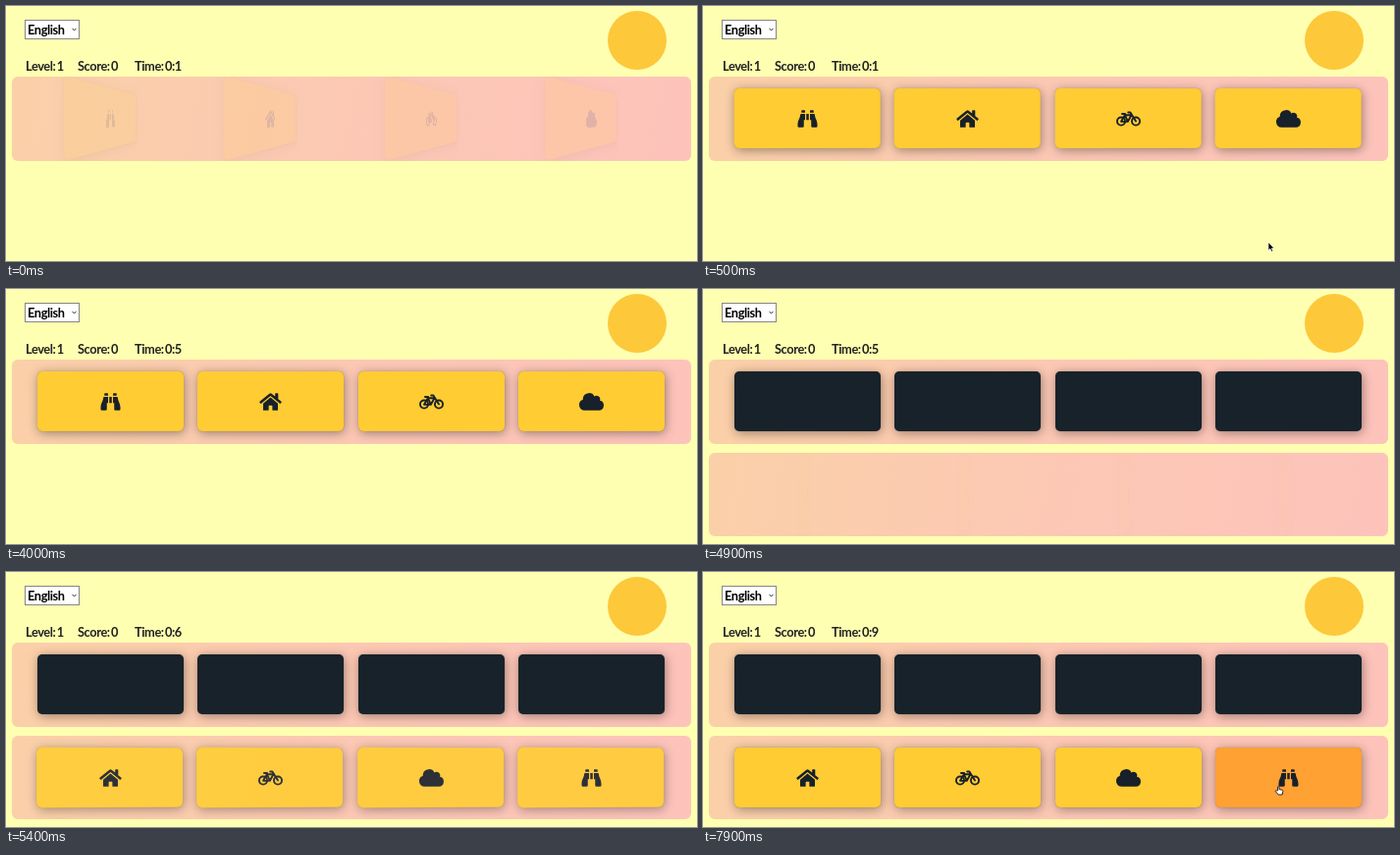
These frames come from a looping animation (704 px wide and 260 px high, 8000 ms). An HTML page:

```html
<!DOCTYPE html>
<html lang="en">
<head>
<meta charset="utf-8">
<style>
  html, body { margin: 0; width: 704px; height: 260px; overflow: hidden; background: #feffb1; }
  body { position: relative; font: 700 12.8px/18px Lato, sans-serif; letter-spacing: -.4px; word-spacing: -1.5px; color: #222; }
  body > *, .card, .pick svg { position: absolute; white-space: nowrap; }
  .pick { left: 19px; top: 14px; width: 52px; height: 18px; padding-left: 2px;
          border: 1px solid #858585; background: #fff; color: #000; }
  .pick svg { left: 47px; top: 7px; }
  .stat { top: 52px; }
  .logo { left: 613px; top: 5px; width: 60px; height: 60px; border-radius: 50%; background: #fdc83a; }
  .row { left: 6px; width: 692px; height: 85.5px; border-radius: 6px;
         background: linear-gradient(100deg, #fad0a8, #fcc8b4 50%, #fdc3bb); overflow: hidden; }
  .card { top: 12px; width: 149.3px; height: 61px; border-radius: 5px; background: #fc3;
          box-shadow: 0 0 1px rgba(0, 0, 0, .4), 1px 2px 11px rgba(0, 0, 0, .38);
          display: flex; align-items: center; justify-content: center; }
  .dark .card { background: #18222a; }
  .card svg { width: 25px; height: 20px; fill: #18202a; }
  .bike { stroke: #18202a; stroke-width: 48; stroke-linejoin: round; stroke-linecap: round; }
  #cursor { left: 0; top: 0; overflow: visible; }
</style>
</head>
<body>
<div class="pick">English<svg width="5" height="4"><path d="M.5 .8 2.5 3 4.5 .8" fill="none" stroke="#333"/></svg></div>
<div class="stat" style="left:20px">Level: 1</div>
<div class="stat" style="left:73px">Score: 0</div>
<div class="stat" style="left:131px">Time: 0:<span id="secs">1</span></div>
<div class="logo"></div>
<div class="row" id="top" style="top:72px"></div>
<div class="row dark" id="hidden" style="top:72px"></div>
<div class="row" id="answers" style="top:166.5px"></div>
<svg id="cursor" width="12" height="16">
  <path id="arrow" d="M0 0V8.2L1.9 6.5 3.2 9.4 4.6 8.8 3.3 6H5.8Z" fill="#000" stroke="#fff" stroke-width=".6"/>
  <path id="hand" d="M1.6 5V.9Q2.3-.2 3 .9V3.6L6.2 4.3Q7 4.6 6.9 5.6L6.2 9H2.2L-.7 5.7Q-.6 4.4 .5 4.8Z" fill="#fff" stroke="#000" stroke-width=".8"/>
</svg>
<script>
const $ = id => document.getElementById(id);
const LOOP = 8000, REVEAL = 4835;

const icons = {
  binoculars: `<path d="M160 96V48q0-16 16-16h64q16 0 16 16v48zM384 96V48q0-16 16-16h64q16 0 16 16v48z
    M128 160q2-32 32-32h96v160h-32v160q0 32-32 32H96q-32 0-32-32v-44c4-130 62-150 64-244z
    M512 160q-2-32-32-32h-96v160h32v160q0 32 32 32h96q32 0 32-32v-44c-4-130-62-150-64-244zM288 128h64v160h-64z"/>`,
  house: `<path d="M320 142 128 300v164q0 16 16 16h112q16 0 16-16v-96q0-16 16-16h64q16 0 16 16v96q0 16 16 16h112q16 0 16-16V300z
    M604 251 520 183V44q0-12-12-12h-56q-12 0-12 12v73L350 43q-30-22-60 0L36 251q-9 8-2 17l26 31q8 9 17 2L320 101 563 301q9 7 17-2l26-31q7-9-2-17z"/>`,
  bicycle: `<g class="bike" fill="none"><circle cx="128" cy="320" r="104"/><circle cx="512" cy="320" r="104"/>
    <path d="M312 88H368L512 320M152 128H232M128 328 226 160H396L304 328H128M226 160 304 328"/></g>`,
  cloud: `<path d="M538 227A96 96 0 0 0 395 112 160 160 0 0 0 96 200 144 144 0 0 0 144 480H512A128 128 0 0 0 538 227z"/>`
};

const flip = [
  { transform: "perspective(222px) rotateY(90deg)", offset: 0, easing: "ease-in" },
  { transform: "perspective(222px) rotateY(-20deg)", offset: .4, easing: "ease-in" },
  { transform: "perspective(222px) rotateY(10deg)", offset: .6, easing: "ease" },
  { transform: "perspective(222px) rotateY(-5deg)", offset: .8, easing: "ease" },
  { transform: "perspective(222px) rotateY(0deg)", offset: 1 }
];
const fade = [{ opacity: 0, offset: 0, easing: "ease-in" }, { opacity: 1, offset: .6 }, { opacity: 1, offset: 1 }];

function deal(row, names) {
  return names.map((name, i) => {
    const card = document.createElement("div");
    card.className = "card";
    card.style.left = 25.7 + 163.5 * i + "px";
    if (name) card.innerHTML = `<svg viewBox="0 0 640 512">${icons[name]}</svg>`;
    row.append(card);
    return card;
  });
}

function flipIn(cards) {
  const anims = cards.flatMap(c => [flip, fade].map(k => c.animate(k, { duration: 1000, fill: "both" })));
  anims.forEach(a => a.pause());
  return t => anims.forEach(a => a.currentTime = Math.max(0, Math.min(1000, t)));
}

const flipTop = flipIn(deal($("top"), ["binoculars", "house", "bicycle", "cloud"]));
deal($("hidden"), ["", "", "", ""]);
const answers = deal($("answers"), ["house", "bicycle", "cloud", "binoculars"]);
const flipAnswers = flipIn(answers);

// Pointer stops: time, x, y
const leave = [[100, 612, 160], [500, 576, 241], [750, 566, 264]];
const enter = [[6400, 560, 264], [7000, 574, 249], [7500, 584, 218], [8000, 584, 218]];

function along(path, t) {
  const i = path.findIndex(p => p[0] > t);
  if (i < 1) return null;
  const [a, b] = [path[i - 1], path[i]];
  const k = (t - a[0]) / (b[0] - a[0]), s = k * k * (3 - 2 * k);
  return [a[1] + (b[1] - a[1]) * s, a[2] + (b[2] - a[2]) * s];
}

function draw(t) {
  const asking = t >= REVEAL;
  $("secs").textContent = 1 + Math.floor(t / 985);
  $("top").style.display = asking ? "none" : "";
  $("hidden").style.display = $("answers").style.display = asking ? "" : "none";
  flipTop(t + 170);
  flipAnswers(t - REVEAL);

  const pos = along(leave, t) || along(enter, t);
  const over = asking && pos && pos[1] < 240;
  $("cursor").style.display = pos ? "" : "none";
  if (pos) $("cursor").style.transform = `translate(${pos[0]}px, ${pos[1]}px)`;
  $("arrow").style.display = over ? "none" : "";
  $("hand").style.display = over ? "" : "none";
  answers[3].style.background = over ? "#ffa133" : "";
}

const start = performance.now();
function tick() {
  draw((performance.now() - start) % LOOP);
  requestAnimationFrame(tick);
}
draw(0);
requestAnimationFrame(tick);
</script>
</body>
</html>
```
